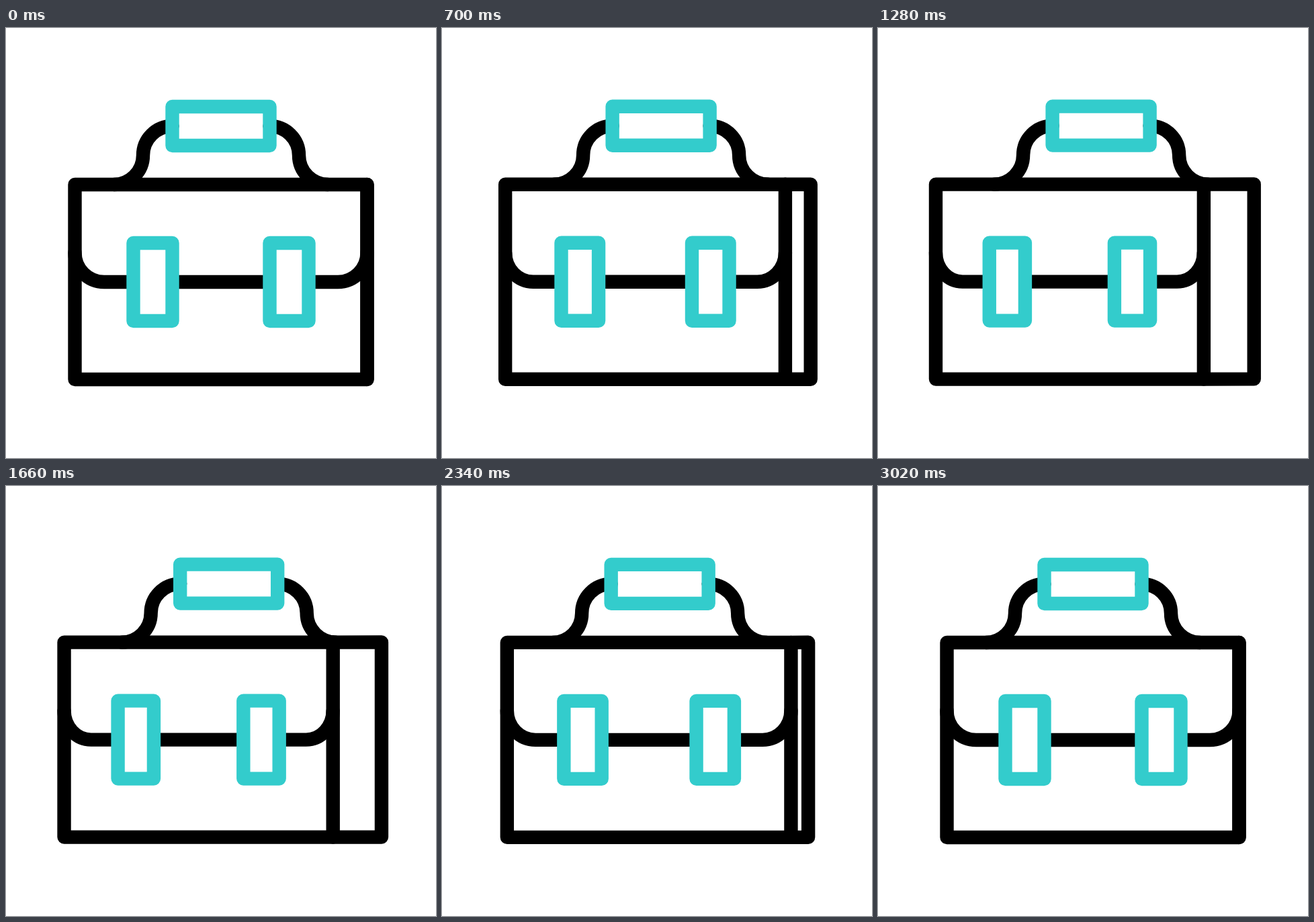
An HTML page with a canvas for the animation above (3600 ms loop, 640x640 px).

```html
<!DOCTYPE html>
<html lang="en">
<head>
<meta charset="utf-8">
<title>Briefcase</title>
<style>
  html, body { margin: 0; width: 100%; height: 100%; overflow: hidden; background: #fff; }
  canvas { display: block; width: 640px; height: 640px; }
</style>
</head>
<body>
<canvas id="stage" width="640" height="640"></canvas>
<script>
const ctx = document.getElementById('stage').getContext('2d');
const LOOP = 3600, STEP = 20, PEAK = 1400, END = 3000;
const LEFT = 102.5, RIGHT = 537.5, TOP = 233, BOTTOM = 523;
const TURN = 53.2; // how far the front's right edge travels
const R = 43.5, K = 0.5523;
const BLACK = '#000', TEAL = '#33cccc';

// Cubic ease through (a, 0) and (b, 1)
function ease(x, a, b) {
  if (x <= 0) return 0;
  if (x >= 1) return 1;
  let lo = 0, hi = 1;
  for (let i = 0; i < 30; i++) {
    const u = (lo + hi) / 2, v = 1 - u;
    if (3 * a * u * v * v + 3 * b * u * u * v + u * u * u < x) lo = u;
    else hi = u;
  }
  return lo * lo * (3 - 2 * lo);
}

function turnAt(t) {
  return t < PEAK
    ? ease(t / PEAK, 0.5, 0.5)
    : 1 - ease((t - PEAK) / (END - PEAK), 0.47, 0.53);
}

function stroke(color, build) {
  ctx.strokeStyle = color;
  ctx.beginPath();
  build();
  ctx.stroke();
}

function box(color, x1, y1, x2, y2) {
  stroke(color, () => ctx.rect(x1, y1, x2 - x1, y2 - y1));
}

function draw(t) {
  const p = turnAt(t), d = TURN * p;
  const front = x => x - d * (0.314 + 0.686 * (x - LEFT) / (RIGHT - LEFT));
  const side = RIGHT + 0.422 * d;

  ctx.setTransform(1, 0, 0, 1, 0, 0);
  ctx.fillStyle = '#fff';
  ctx.fillRect(0, 0, 640, 640);
  ctx.translate(0, -0.4 * p);
  ctx.lineWidth = 20.4;
  ctx.lineJoin = ctx.lineCap = 'round';

  // Handle
  const mid = 320 + 0.23 * d;
  for (const s of [-1, 1]) {
    stroke(BLACK, () => {
      const x = r => mid + s * r;
      ctx.moveTo(x(159.5), TOP);
      ctx.bezierCurveTo(x(159.5 - R * K), TOP, x(116), TOP - R + R * K, x(116), TOP - R);
      ctx.bezierCurveTo(x(116), TOP - R - R * K, x(72.5 + R * K), 146, x(72.5), 146);
    });
  }
  box(TEAL, mid - 72.5, 117, mid + 72.5, 175);

  // Side panel
  stroke(BLACK, () => {
    ctx.moveTo(front(RIGHT), TOP);
    ctx.lineTo(side, TOP - 0.2 * p);
    ctx.lineTo(side, BOTTOM - 0.2 * p);
    ctx.lineTo(front(RIGHT), BOTTOM);
  });

  // Front and flap
  box(BLACK, front(LEFT), TOP, front(RIGHT), BOTTOM);
  stroke(BLACK, () => {
    const y = 378, c = R * (1 - K);
    ctx.moveTo(front(LEFT), y - R);
    ctx.bezierCurveTo(front(LEFT), y - c, front(LEFT + c), y, front(LEFT + R), y);
    ctx.lineTo(front(RIGHT - R), y);
    ctx.bezierCurveTo(front(RIGHT - c), y, front(RIGHT), y - c, front(RIGHT), y - R);
  });

  // Clasps
  for (const x of [189.5, 392.5]) {
    const a = front(x), b = front(x + 58);
    ctx.fillRect(a, 320, b - a, 116);
    box(TEAL, a, 320, b, 436);
  }
}

const start = performance.now();
function tick() {
  const t = (performance.now() - start) % LOOP;
  draw(Math.floor(t / STEP) * STEP);
  requestAnimationFrame(tick);
}
tick();
</script>
</body>
</html>
```
